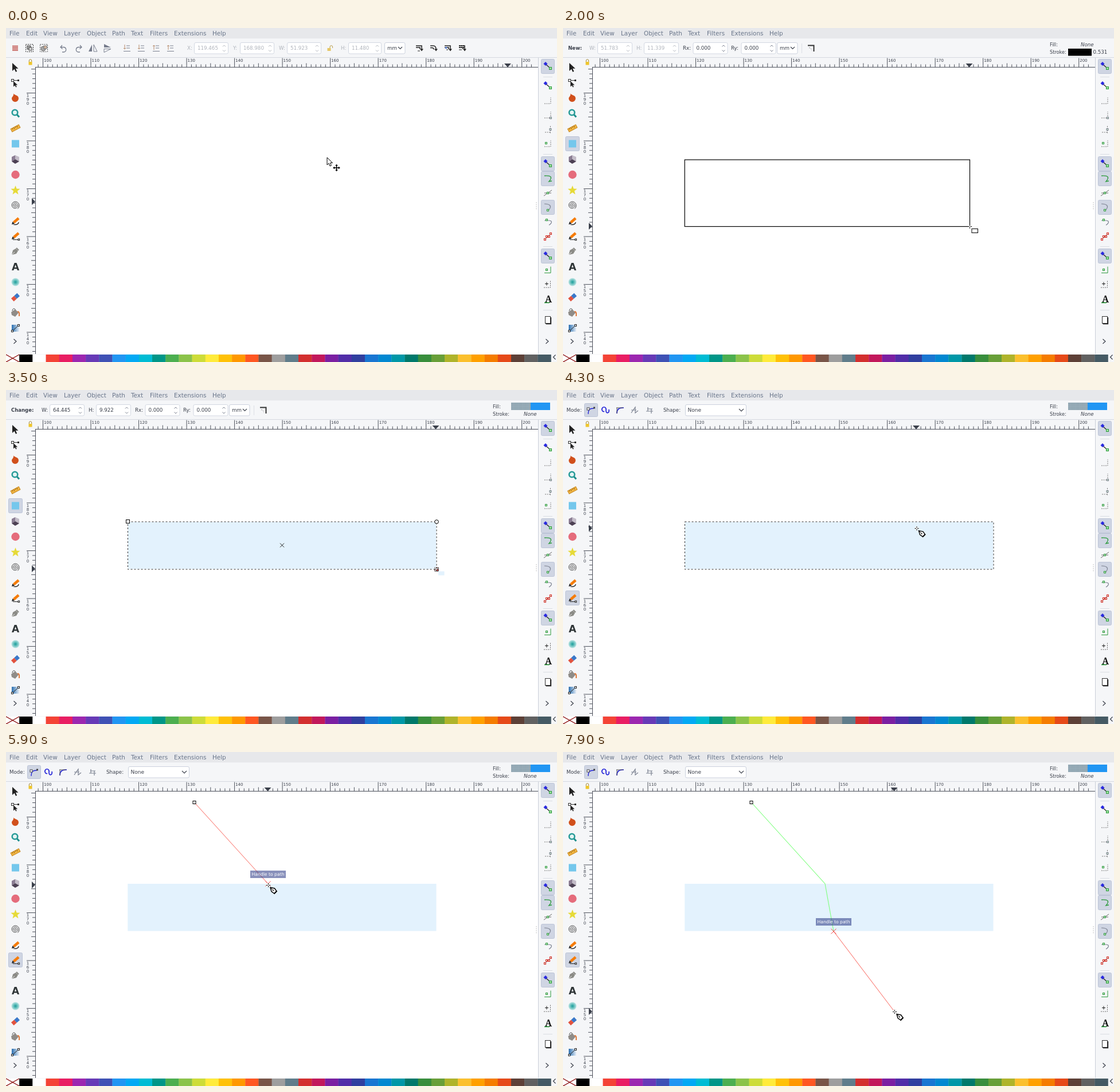
These frames come from a looping animation (961 by 583 pixels, 8000 ms). An HTML page:

```html
<!DOCTYPE html>
<html lang="en">
<head>
<meta charset="utf-8">
<title>Drawing editor</title>
<style>
html, body { margin: 0; width: 100%; height: 100%; overflow: hidden; background: #f5f6f8; }
svg { display: block; width: 961px; height: 583px; font-family: "DejaVu Sans", "Noto Sans", sans-serif; }
text { white-space: pre; }
</style>
</head>
<body>
<svg id="stage" viewBox="0 0 961 583" xmlns="http://www.w3.org/2000/svg"></svg>
<script>
const INK = '#3a3f4a', GREY = '#7b8190', DIM = '#b0b4bc', GREEN = '#2c9a3c', ORANGE = '#f57c0a';
const BAR = '#f5f6f8', ON = '#cfd5e3';

// Markup helpers
const path = (d, stroke = INK, fill = 'none', w = 1, more = '') =>
  `<path d="${d}" stroke="${stroke}" fill="${fill}" stroke-width="${w}" ${more}/>`;
const solid = (d, fill) => path(d, 'none', fill);
const rect = (x, y, w, h, fill, stroke = 'none', more = '') =>
  `<rect x="${x}" y="${y}" width="${w}" height="${h}" fill="${fill}" stroke="${stroke}" ${more}/>`;
const disc = (x, y, r, fill, stroke = 'none', w = 1) =>
  `<circle cx="${x}" cy="${y}" r="${r}" fill="${fill}" stroke="${stroke}" stroke-width="${w}"/>`;
const text = (x, y, s, size = 8.7, fill = INK, more = '') =>
  `<text x="${x}" y="${y}" font-size="${size}" fill="${fill}" ${more}>${s}</text>`;
const group = (id, body, more = '') => `<g id="${id}" ${more}>${body}</g>`;
const at = (x, y, body, turn = 0) => `<g transform="translate(${x} ${y}) rotate(${turn})">${body}</g>`;
const dashed = 'stroke-dasharray="2 1.5"';

function menu() {
  const items = [['File', 6], ['Edit', 35], ['View', 65], ['Layer', 101], ['Object', 141], ['Path', 185],
    ['Text', 218], ['Filters', 251], ['Extensions', 293], ['Help', 360]];
  return rect(0, 0, 961, 18.5, '#e7e8eb') +
    items.map(([s, x]) => text(x, 13.3, s, 10.4, '#69758a')).join('');
}

function rulers() {
  const step = 8.352;
  let d = '', out = '';
  for (let k = -1; k < 104; k++) {
    const len = k % 10 === 0 ? 16 : k % 5 === 0 ? 7 : 5;
    const x = 64.5 + step * k;
    if (x < 924) d += `M${x} 68.5v${-len}`;
    const y = 113.5 + step * (k - 5);
    if (y > 70 && y < 569) d += `M51 ${y}h${-((k - 5) % 10 === 0 ? 15 : (k - 5) % 5 === 0 ? 7 : 5)}`;
  }
  for (let i = 0; i < 11; i++) out += text(66 + 83.52 * i, 59, 100 + 10 * i, 7);
  for (let i = 0; i < 6; i++) {
    [...String(190 - 10 * i)].forEach((ch, n) => {
      out += text(38, 120.3 + 83.52 * i + 7 * n, ch, 7, INK, 'text-anchor="middle"');
    });
  }
  return path(d + 'M51 68.5H928M51.5 68V569', INK, 'none', .9) + out +
    path('M40.3 59v-2a2.2 2.2 0 0 1 4.4 0v2', '#a58b3a') + rect(39.5, 59, 6, 5.5, '#eec52c');
}

function palette() {
  const hues = ('f44336 e91e63 9c27b0 673ab7 3f51b5 2196f3 03a9f4 00bcd4 009688 4caf50 8bc34a cddc39 ffeb3b ' +
    'ffc107 ff9800 ff5722 795548 9e9e9e 607d8b d32f2f c2185b 7b1fa2 512da8 303f9f 1976d2 0288d1 0097a7 ' +
    '00796b 388e3c 689f38 afb42b fbc02d ffa000 f57c00 e64a19 5d4037 616161 455a64').split(' ');
  const w = 950.5 / 41;
  return rect(0, 569, 961, 14, BAR) + rect(0, 570, w, 13, '#fff') +
    path(`M0 570L${w} 583M${w} 570L0 583`, '#8c1010', 'none', 1.4) +
    ['000', 'fff', ...hues].map((h, i) => rect((i + 1) * w, 570, w + .3, 13, '#' + h)).join('') +
    path('M958.5 570.5l-4 4 4 4', INK, 'none', 1.2);
}

const spiral = () => {
  let d = 'M16 309';
  for (let a = 0; a < 20; a += .3) d += `L${16 + a * .37 * Math.cos(a)} ${309.5 + a * .37 * Math.sin(a)}`;
  return path(d, '#444');
};
const star = () => {
  let d = '';
  for (let i = 0; i < 10; i++) {
    const a = i * Math.PI / 5, r = i % 2 ? 3.6 : 8.5;
    d += `${i ? 'L' : 'M'}${16.5 + r * Math.sin(a)} ${283.5 - r * Math.cos(a)}`;
  }
  return solid(d + 'Z', '#e6da38');
};
const pencil = y => path(`M13.5 ${y + 2.5}L22 ${y - 5}`, ORANGE, 'none', 4.6) +
  solid(`M10 ${y + 6}l1.5-5 3.6 3.5Z`, '#222');
const chevron = (x, y) => path(`M${x - 2.5} ${y - 4}l4.5 4-4.5 4`, INK, 'none', 1.2);

function toolbox() {
  return solid('M11 61v14l3.6-3.2 2.4 5 2.2-1-2.3-5h4.6Z', '#222') +
    path('M12 91.5h9', '#333') + rect(9.5, 89.5, 4, 4, '#fff', '#333') + rect(20, 90, 3, 3, '#333') +
    solid('M13 93v9.500l2.600-2.200 1.600 3.200 1.500-.8-1.600-3.200h3.200Z', '#222') +
    solid('M13 114c1 4 9 2 9 9a6 6 0 0 1-12 0c0-3 4-4 3-9Z', '#d1501c') +
    path('M19 151l4 4.500', '#1f8f8c', 'none', 3) + disc(15.5, 147.500, 4.800, '#e4f4f4', '#279b98', 2.600) +
    at(16.5, 175, rect(-8, -2.8, 16, 5.6, '#f2b643', '#c98a24') + path('M-5-2.500v2M-2-2.500v3M1-2.500v2M4-2.500v3', '#8a5b12'), -28) +
    rect(10, 195.5, 13, 13, '#74c7ec') +
    solid('M10 225l6-3v7l-6 4Z', '#8b7d93') + solid('M16 222l7 3v8l-7-4Z', '#c3bcc8') + solid('M10 233l6-4 7 4-7 4Z', '#4d4154') +
    disc(16.5, 256, 7.2, '#e56c7c') + star() + spiral() +
    pencil(337) + path('M13 343c3 1 9 0 9-4', '#222', 'none', 1.3) +
    pencil(363) + path('M12 369.500h10', '#222') + rect(21, 368, 2.600, 2.600, '#fff', '#222') +
    solid('M10 396l2-8 5-3 4 4-3 5Z', '#8b8b86') + path('M18 384l4 4', '#8b8b86', 'none', 2.4) + path('M10 396l5-5', '#eee') +
    text(16.5, 423, 'A', 17, '#2e3436', 'text-anchor="middle" font-weight="bold"') +
    '<radialGradient id="glow"><stop offset=".1" stop-color="#27a3a0"/><stop offset="1" stop-color="#bfe6e5"/></radialGradient>' +
    disc(16.5, 443.5, 7, 'url(#glow)') +
    at(16.5, 470, rect(-7, -3.5, 7, 7, '#e2533f') + rect(0, -3.5, 7, 7, '#3a78c9'), -42) +
    path('M11 494c0-6 6-5 6 0', '#555') + solid('M9 496l7-5 6 6-6 7-6-3Z', '#8f8c88') + path('M20 495c4 0 3 4 3 8', '#e0783a', 'none', 2) +
    '<linearGradient id="fade"><stop stop-color="#2a6fb0"/><stop offset="1" stop-color="#e6eef7"/></linearGradient>' +
    rect(10, 518, 13, 12, 'url(#fade)') + path('M11 529L22 519', '#222') + rect(9.5, 527.500, 3, 3, '#fff', '#222') + rect(20.500, 517.500, 3, 3, '#fff', '#222') +
    chevron(16, 547);
}

function snapBar() {
  const link = y => path(`M941 ${y - 4}l8 7`, '#222', 'none', 1.2) + solid(`M941 ${y - 8}l3.500 3.500-3.500 3.500-3.500-3.500Z`, '#2a2ae0') +
    rect(947.5, y + 1.5, 4, 4, '#9be09b', GREEN);
  const corner = y => path(`M939 ${y + 5}h11v-11`, '#777', 'none', 1, dashed);
  const dot = (x, y, c = GREEN) => rect(x - 1.5, y - 1.5, 3, 3, '#cfe8cf', c);
  return rect(929, 52, 32, 517, BAR) + path('M928.500 52V569', '#c9ced8') +
    [67, 237, 263, 313, 398].map(y => rect(933.5, y - 12.5, 23, 25, ON, '#bcc4d6', 'rx="2"')).join('') +
    path('M937 85.500h16M937 220.500h16M937 381.500h16M937 492.500h16', '#dadde3') +
    [67, 101, 237, 398].map(link).join('') +
    corner(127) + corner(152) + dot(950, 157, GREY) + path('M949.500 171v13M940 182h9', '#777', 'none', 1, dashed) + dot(949.500, 177, GREY) +
    corner(202) + dot(942, 201) +
    path('M939 258c13-1 14 3 8 10l5-1', GREEN, 'none', 1.4) +
    path('M938 293l14-10M939 288h12', '#666') + dot(945, 288) +
    path('M939 307c11 0 14 5 6 12', GREY, 'none', 1.2) + dot(945, 318) +
    path('M939 336h7c8 0 6 5 1 8', GREY, 'none', 1.2) + dot(943, 335) +
    path('M939 370l12-12', '#444') + [[940, 369], [943, 364], [947, 364], [950, 359]].map(([x, y]) => dot(x, y, '#d22')).join('') +
    path('M939 427.500h11v-11', GREEN) + dot(943, 422) +
    path('M940 446.500h6M943 443.500v6', '#222') + path('M938 453h11.500v-12', '#666', 'none', 1, dashed) +
    text(946, 479, 'A', 16, '#111', 'text-anchor="middle" font-weight="bold" font-family="Noto Serif, serif"') + path('M939 479.500h9', GREEN, 'none', 1.6) +
    rect(940.5, 503.5, 9, 12, '#fff', '#333') + path('M950.500 505v11.500h-9', '#222', 'none', 1.3) +
    chevron(944, 547) +
    [305, 308.500, 312, 315.500].map(y => disc(925, y, .7, '#aaa')).join('');
}

// Toolbar widgets
const field = (x, value, ink = INK, w = 59, arrows = true) =>
  rect(x + .5, 25.5, w, 19.5, '#fff', '#d3d8e2', 'rx="2.500"') + text(x + 6, 38, value, 8.7, ink) +
  path(`M${x + w - 9} 32.500l2.500-2.500 2.500 2.500M${x + w - 9} 38.500l2.500 2.500 2.500-2.500`, arrows ? GREY : DIM);
const units = x => rect(x + .5, 25.5, 35.5, 19.5, '#fff', '#cbd1dd', 'rx="2.500"') + text(x + 5, 38, 'mm') +
  path(`M${x + 24} 33l3.500 3.500 3.500-3.500`, INK, 'none', 1.1);

function selectBar() {
  const stack = (x, up) => path(`M${x - 1} 31h6M${x - 1} 35h6M${x - 6} 40.500h12`, GREY) +
    path(up ? `M${x - 4} 38v-8m-2 2l2-2 2 2` : `M${x - 4} 29v8m-2-2l2 2 2-2`, '#b58a6a');
  const scale = (x, inner) => path(`M${x - 5} 31h10v6M${x - 5} 34h7v3`, '#222', 'none', 1.5) + path(inner, '#222');
  return path('M11 31.500h10M11 34h10M11 36.500h10M11 39h10', '#c0504a', 'none', 1.3) +
    rect(34.5, 28.5, 13, 13, 'none', '#333', dashed) + rect(37, 31, 6, 6, '#aaa', '#444') + rect(40, 34, 5, 5, '#ddd', '#444') +
    rect(59.5, 28.5, 13, 13, 'none', '#555', dashed) + disc(65, 36, 4, '#a8a8a8', '#666') + rect(66, 31, 5, 5, '#d8b8a0', '#777') +
    path('M98 30l-3 3.500 3.500 3M95 33.500h6a4.300 4.300 0 0 1 0 8.500h-3', GREY, 'none', 1.3) +
    path('M129 30l3 3.500-3.500 3M132 33.500h-6a4.300 4.300 0 0 0 0 8.500h3', GREY, 'none', 1.3) +
    solid('M150 29v12h-6Z', '#767c8c') + path('M153 29v12h6Z', GREY) +
    solid('M171 34v-6l12 6Z', '#767c8c') + path('M171 36.500v6l12-6Z', GREY) +
    stack(211, false) + stack(236, false) + stack(262, true) + stack(287, true) +
    text(316, 38, 'X:', 8.7, DIM) + field(328, '119.465', DIM, 59, false) +
    text(396, 38, 'Y:', 8.7, DIM) + field(408, '168.980', DIM, 59, false) +
    text(476, 38, 'W:', 8.7, DIM) + field(490, '51.923', DIM, 59, false) +
    path('M565 35v-2a2.300 2.300 0 0 1 4.600 0v2', '#b99c4a') + rect(560.5, 35, 6, 5, '#e6c766') +
    text(584, 38, 'H:', 8.7, DIM) + field(597, '11.480', DIM, 57, false) + units(660) +
    scale(720, 'M718 40h4') + path('M740 31h5c4 0 5 2 5 6M740 34.500h3c2 0 3 1 3 3', '#222', 'none', 1.4) +
    scale(770, 'M768 38h3') + rect(766, 33, 3, 3, '#5b7fd0') + scale(795, 'M790 38h5') + path('M790 31h10M790 34h10', '#222', 'none', 2, dashed) +
    [720, 745, 770, 795].map(x => solid(`M${x + 2} 36.500h6l-3 4Z`, '#222')).join('');
}

const rectBar = (label, dx, w, h, ink) =>
  text(9, 38, label, 8.5, INK, 'font-weight="bold"') +
  text(46 + dx, 38, 'W:', 8.7, ink) + field(60 + dx, w, ink, 60, ink === INK) +
  text(128 + dx, 38, 'H:', 8.7, ink) + field(141 + dx, h, ink, 60, ink === INK) +
  text(209 + dx, 38, 'Rx:') + field(226.5 + dx, '0.000', INK, 60) +
  text(293 + dx, 38, 'Ry:') + field(310.5 + dx, '0.000', INK, 60) + units(373 + dx) +
  path(`M${416.5 + dx} 27v17`, '#dcdfe5') + path(`M${427 + dx} 30.500h10.500v10.500`, '#333', 'none', 2) +
  path(`M${429 + dx} 34.500c3 0 4.500 2 4.500 5`, '#999', 'none', 1, dashed);

const penBar = () => text(6, 38, 'Mode:') + rect(37.5, 23.5, 23, 23, ON, '#bcc4d6', 'rx="2"') +
  path('M44 42c0-8 3-10 10-10', '#2222d8', 'none', 1.3) + rect(42, 31, 4, 4, '#fff', '#444') + rect(53, 29.5, 3, 3, '#444') +
  path('M68 35c-1-7 8-7 7 0s7 6 5-1m-12 1c1 3 3 3 4 2', '#2222d8', 'none', 1.7) +
  path('M94 41c0-8 4-10 12-10', '#2222d8', 'none', 1.7) + path('M93 31h12M94 31v10', '#555') +
  path('M119 40l7-10v10l5-4M119 35h9', GREY, 'none', 1.2) +
  path('M145 37h12M147 33h9M148 30v7M154 33v8', GREY, 'none', 1.2) +
  text(175, 38, 'Shape:') + rect(213.5, 25.5, 106, 19.5, '#fff', '#cbd1dd', 'rx="2.500"') + text(217.5, 38, 'None', 9) +
  path('M307 33l4 4 4-4', INK, 'none', 1.1);

function paintInfo() {
  const none = y => text(903, y, 'None', 8.7, INK, 'font-style="italic"');
  let check = '';
  for (let i = 0; i < 20; i++) check += rect(881 + (i >> 1) * 3.4, 22 + (i + (i >> 1)) % 2 * 6.5, 3.4, 6.5, '#93a8b4');
  return group('info', text(849, 32, 'Fill:', 8.4) + text(849, 45, 'Stroke:', 8.2) +
    group('outlined', none(32) + rect(881, 36, 41, 12.5, '#000') + text(924.5, 45, '0.531')) +
    group('filled', rect(881, 22, 34, 13, '#a9bdc8') + check + rect(915, 22, 34, 13, '#2196f3') + none(45)));
}

const cross = path('M-3 0h7M0-3v7', '#fff', 'none', 2.6) + path('M-3 .5h2.500M1.500 .5h2.500M.5-3v2.500M.5 1.500v2.500', '#000');
const cursors = () =>
  group('arrow', path('M0 0v13l3-2.800 2 4.800 2.400-1-2-4.600h4Z', '#000', '#fff') +
    path('M16.500 13v10M11.500 18h10M15 14.500l1.500-1.700 1.500 1.700M15 21.500l1.500 1.700 1.500-1.700M13 16.500l-1.700 1.500 1.700 1.500M20 16.500l1.700 1.500-1.700 1.500', '#000', 'none', 1.5)) +
  group('boxer', cross + rect(4, 4.500, 10.5, 7, '#fff', '#000', 'id="chip"')) +
  group('nib', cross + path('M4 4.500l2 7 5 3.500 4-4-3.500-5Z', '#000', '#fff', 1.4) + path('M4.500 5l4 4', '#000') +
    disc(9, 9.5, 1, '#000') + path('M10.500 15.500l5-5', '#000', 'none', 2));

const box = 'M212.500 230H751V313H212.500Z';
stage.innerHTML =
  rect(0, 0, 961, 583, BAR) + rect(51, 69, 877, 500, '#fff') +
  rect(0, 0, 0, 0, 'none', '#000', 'id="shape" stroke-width="1.200"') +
  group('frame', path(box, '#fff') + path(box, '#333', 'none', 1, 'stroke-dasharray="3 3"')) +
  group('handles', rect(209.5, 226.5, 6, 6, '#fff', '#000') + disc(751, 230, 3.3, '#fff', '#000') +
    rect(748, 310, 6, 6, '#e23a3a', '#000') + path('M478 267.500l7 7m0-7l-7 7', '#222')) +
  path('', '#7dff7d', 'none', 1.1, 'id="done"') + path('', '#fa7f78', 'none', 1.1, 'id="live"') +
  rect(326, 85.500, 5, 5, '#fff', '#000', 'id="start"') +
  group('snap', path('M-4.500-4.500l9 9m0-9l-9 9', '#f04848') + rect(-31, -23, 62, 13, 'rgba(44,58,135,.56)') +
    text(0, -13.7, 'Handle to path', 7.7, '#fff', 'text-anchor="middle"')) +
  menu() + rect(0, 18.5, 961, 33.5, BAR) + path('M0 51.500H961', '#d5d9e0') + rulers() +
  group('mx', solid('M-6 62H6L0 68.500Z', INK)) + group('my', solid('M45-6V6L51 0Z', INK)) +
  group('picked', rect(4.5, .5, 24, 25, ON, '#bcc4d6', 'rx="2"')) + toolbox() + snapBar() + palette() +
  group('selectBar', selectBar()) + group('newBar', rectBar('New:', 0, '51.783', '11.339', DIM)) +
  group('editBar', rectBar('Change:', 16, '64.445', '9.922', INK)) + group('penBar', penBar()) +
  paintInfo() + group('cursor', cursors());

const $ = id => document.getElementById(id);
const show = (id, on) => $(id).setAttribute('display', on ? 'inline' : 'none');
const move = (id, x, y) => $(id).setAttribute('transform', `translate(${x} ${y})`);
const set = (id, attrs) => { for (const k in attrs) $(id).setAttribute(k, attrs[k]); };

// Pointer path: time, x, y
const route = [[0, 560, 226], [400, 560, 226], [800, 212, 230], [1100, 212, 230], [1900, 694, 352], [2000, 709, 346],
  [2600, 750, 312], [4000, 750, 312], [4800, 328, 88], [4900, 328, 88], [5500, 446, 232], [5600, 446, 232],
  [5700, 457, 232], [5900, 457, 232], [6200, 485, 297], [6300, 485, 297], [6700, 485, 315], [7300, 485, 315],
  [7900, 578, 453], [8000, 578, 453]];

function pointer(t) {
  const i = route.findIndex(p => p[0] > t);
  const [t0, x0, y0] = route[i - 1], [t1, x1, y1] = route[i];
  const u = (t - t0) / (t1 - t0), e = u * u * (3 - 2 * u);
  return [x0 + (x1 - x0) * e, y0 + (y1 - y0) * e];
}

function draw(t) {
  const [x, y] = pointer(t);
  const boxTool = t >= 1100 && t < 4000, pen = t >= 4000, filled = t >= 3500;

  show('selectBar', t < 1100);
  show('newBar', boxTool && t < 2700);
  show('editBar', boxTool && t >= 2700);
  show('penBar', pen);
  show('info', t >= 1100);
  show('outlined', !filled);
  show('filled', filled);
  show('picked', t >= 1100);
  move('picked', 0, pen ? 350 : 189);

  show('arrow', t < 1100);
  show('boxer', boxTool);
  show('nib', pen);
  set('chip', { fill: filled ? '#e3f2fd' : '#fff', stroke: filled ? 'none' : '#000' });
  move('cursor', x, y);
  move('mx', t < 500 ? 875 : x - .5, 0);
  move('my', 0, t < 500 ? 303 : y);

  const right = t < 2600 ? x + .5 : 750.5, bottom = t < 2600 ? y + .5 : 312.5;
  show('shape', t >= 1200);
  set('shape', { x: 212.3, y: 230, width: Math.max(0, right - 212.3), height: Math.max(0, bottom - 230),
    fill: filled ? '#e3f2fd' : 'none', stroke: filled ? 'none' : '#000' });
  show('frame', t >= 2700 && t < 4900);
  show('handles', t >= 2700 && t < 4000);

  const a = '328.500 88', b = '457 230', c = '472 313';
  const from = t < 6000 ? a : t < 7300 ? b : c;
  const snapped = t >= 5700 && t < 6000 ? b : t >= 6700 && t < 6900 ? '485 313' : t >= 6900 && t < 7300 ? c : `${x} ${y}`;
  show('start', t >= 4900);
  set('live', { d: t >= 5000 ? `M${from}L${snapped}` : '' });
  set('done', { d: t < 6000 ? '' : `M${a}L${b}` + (t < 7300 ? '' : `L${c}`) });
  show('snap', t >= 5700);
  if (t < 6700) move('snap', 457, 230);
  else move('snap', t < 6900 ? 485 : 472, 313);
}

function tick(now) {
  draw(Math.floor(now % 8000 / 100) * 100);
  requestAnimationFrame(tick);
}
draw(0);
requestAnimationFrame(tick);
</script>
</body>
</html>
```
